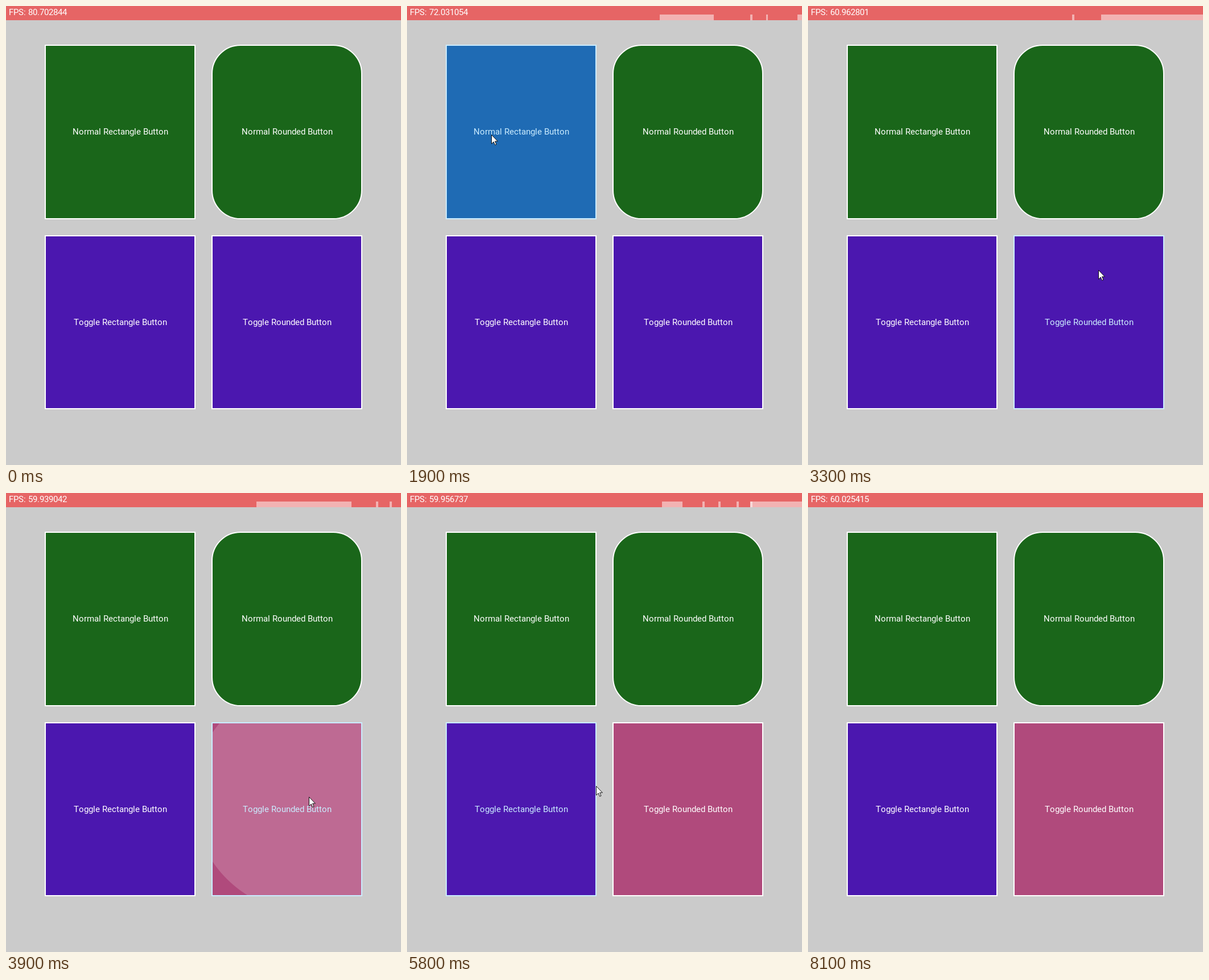
Recreate the animation shown at these times as an HTML page with a canvas. Size 694 px wide and 807 px high, loop 8200 ms.

```html
<!DOCTYPE html>
<html lang="en">
<head>
<meta charset="utf-8">
<title>Button demo</title>
<style>
html, body { margin: 0; width: 100%; height: 100%; overflow: hidden; background: #cbcbcb; }
canvas { display: block; }
</style>
</head>
<body>
<canvas id="stage" width="694" height="807"></canvas>
<script>
const ctx = document.getElementById('stage').getContext('2d');
const LOOP = 8200, STEP = 100, FADE = 200, RIPPLE = 600, HOLD = 110;
const GREEN = [26, 102, 26], BLUE = [24, 102, 178], PURPLE = [75, 23, 175], PINK = [176, 74, 124];
const WHITE = [255, 255, 255], ICE = [202, 236, 255];

// presses: when the button is pushed down
const buttons = [
  { label: 'Normal Rectangle Button', presses: [1533] },
  { label: 'Normal Rounded Button', presses: [2233], radius: 50 },
  { label: 'Toggle Rectangle Button', presses: [5083, 5317], toggle: true },
  { label: 'Toggle Rounded Button', presses: [3717, 6233, 6561], toggle: true }
];
buttons.forEach((b, i) => {
  const x = 69.4 + i % 2 * 292.6, y = 69.4 + (i >> 1) * 334.3;
  b.x = Math.round(x);
  b.y = Math.round(y);
  b.w = Math.round(x + 262.6) - b.x;
  b.h = Math.round(y + 304.3) - b.y;
  b.shape = new Path2D();
  b.shape.roundRect(b.x, b.y, b.w, b.h, b.radius || 0);
});

// The pointer glides from stop to stop and rests in between
const entry = { x: 430, y: 0 };
const moves = [
  { from: 275, to: 415, x: 408, y: 150 },
  { from: 860, to: 1240, x: 114, y: 226 },
  { from: 1867, to: 2180, x: 438, y: 230 },
  { from: 2550, to: 3525, x: 532, y: 534 },
  { from: 4083, to: 4680, x: 200, y: 536 },
  { from: 4783, to: 4900, x: 182, y: 534 },
  { from: 5433, to: 6150, x: 475, y: 496 },
  { from: 6750, to: 6960, x: 694, y: 510 }
];

// Frame rate at a few times; the readout refreshes every half second
const rates = [[0, 80.702844], [1000, 77.0533], [2500, 61.986561], [3500, 59.939042],
  [5000, 59.948402], [6500, 59.973408], [8000, 60.025415]];

const mix = (a, b, k) => a + (b - a) * k;
const rgb = (a, b, k) => `rgb(${a.map((v, i) => Math.round(mix(v, b[i], k)))})`;

function pointer(t) {
  if (t < moves[0].from || t > moves[moves.length - 1].to) return null;
  let at = entry;
  for (const m of moves) {
    if (t < m.from) break;
    const k = Math.min((t - m.from) / (m.to - m.from), 1);
    at = { x: mix(at.x, m.x, k), y: mix(at.y, m.y, k) };
  }
  return at;
}

// Linear fade: share of the last FADE ms spent over the button
function hover(b, t) {
  let hits = 0;
  for (let d = 0; d < FADE; d += 4) {
    const p = pointer(t - d);
    if (p && p.x >= b.x && p.x <= b.x + b.w && p.y >= b.y && p.y <= b.y + b.h) hits++;
  }
  return hits * 4 / FADE;
}

// Glyphs advance by whole pixels
function drawText(s, x, y, color, centered) {
  ctx.font = '15px Roboto, sans-serif';
  ctx.fillStyle = color;
  const widths = [...s].map(c => Math.round(ctx.measureText(c).width));
  if (centered) x = Math.round(x - widths.reduce((a, b) => a + b) / 2);
  widths.forEach((w, i) => {
    ctx.fillText(s[i], x, y);
    x += w;
  });
}

function drawRipple(start, t) {
  const age = (t - start) / RIPPLE;
  if (age >= 1) return;
  const e = 1 - (1 - age) ** 3, p = pointer(start);
  ctx.fillStyle = `rgba(255,255,255,${0.52 * (1 - e)})`;
  ctx.beginPath();
  ctx.arc(p.x, p.y + 0.5, mix(5, 304, e), 0, 7);
  ctx.fill();
}

function drawButton(b, t) {
  const glow = hover(b, t), done = b.presses.filter(p => p <= t);
  const tint = rgb(WHITE, ICE, glow);
  ctx.save();
  ctx.clip(b.shape);
  ctx.fillStyle = b.toggle ? rgb(PURPLE, PINK, done.length % 2) : rgb(GREEN, BLUE, glow);
  ctx.fillRect(b.x, b.y, b.w, b.h);
  if (done.length) drawRipple(done.pop(), t);
  ctx.restore();
  ctx.strokeStyle = tint;
  ctx.lineWidth = 2;
  ctx.stroke(b.shape);
  drawText(b.label, b.x + b.w / 2, b.y + 157.5 | 0, tint, true);
}

function readout(t) {
  const now = Math.floor(t / 500) * 500;
  const i = Math.max(rates.findIndex(r => r[0] >= now), 1);
  const [t0, a] = rates[i - 1], [t1, b] = rates[i];
  return 'FPS: ' + mix(a, b, (now - t0) / (t1 - t0)).toFixed(6);
}

// Scrolling history of input: one cell per 1/60 s, 64 cells wide
function drawMonitor(t) {
  ctx.fillStyle = '#e66565';
  ctx.fillRect(0, 0, 694, 25);
  const tick = ms => Math.floor(ms * 0.06), first = tick(t) - 64;
  const edge = n => Math.round(440 + Math.min(Math.max(n - first, 0), 64) * 254 / 64);
  const bar = (from, to) => {
    const x = edge(tick(from));
    ctx.fillRect(x, 15, edge(tick(to) + 1) - x, 10);
  };
  ctx.fillStyle = 'rgba(255,255,255,.5)';
  moves.forEach(m => bar(m.from, m.to));
  buttons.flatMap(b => b.presses).forEach(p => {
    bar(p, p);
    bar(p + HOLD, p + HOLD);
  });
  drawText(readout(t), 5, 16, '#fff');
}

const arrow = new Path2D('M.5.5V16.3L4.2 12.8L6.6 18.4L9 17.4L6.6 11.9H11.4Z');

function drawPointer(p) {
  ctx.save();
  ctx.translate(Math.round(p.x), Math.round(p.y));
  ctx.fillStyle = '#fff';
  ctx.fill(arrow);
  ctx.strokeStyle = '#111';
  ctx.lineWidth = 1;
  ctx.stroke(arrow);
  ctx.restore();
}

function draw(t) {
  ctx.fillStyle = '#cbcbcb';
  ctx.fillRect(0, 0, 694, 807);
  buttons.forEach(b => drawButton(b, t));
  drawMonitor(t);
  const p = pointer(t);
  if (p) drawPointer(p);
}

const begin = performance.now();
function frame() {
  const t = (performance.now() - begin) % LOOP;
  draw(Math.floor(t / STEP) * STEP);
  requestAnimationFrame(frame);
}
frame();
</script>
</body>
</html>
```
